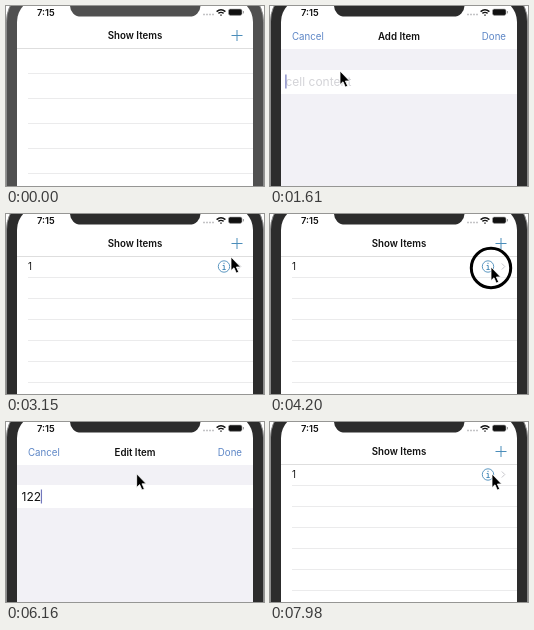
Animation of 258x180 px, one loop 8 s. Source, as an HTML page:

```html
<!DOCTYPE html>
<html lang="en">
<head>
<meta charset="utf-8">
<style>
  html, body { margin: 0; width: 100%; height: 100%; overflow: hidden; background: #fff; }
  svg { display: block; width: 100vw; height: 100vh; }
  text { font: 9.7px Inter, "Liberation Sans", sans-serif; fill: #111; }
  .bold { font-weight: 600; }
  .mid { text-anchor: middle; }
  .link { fill: #5d86c6; }
  .field { font-size: 12px; }
  .line { fill: none; stroke: #ebebec; }
  .blue { fill: none; stroke: #4b8dba; }
</style>
</head>
<body>
<svg viewBox="0 0 258 180">
  <defs>
    <clipPath id="glass"><rect x="11" y="-8" width="236" height="300" rx="24"/></clipPath>
  </defs>
  <rect id="bezel" x="0.5" y="-19.5" width="257" height="320" rx="35" stroke="#8b8b8b"/>
  <g clip-path="url(#glass)">
    <rect x="11" y="-8" width="236" height="190" fill="#fff"/>

    <g id="list">
      <text class="bold mid" x="129" y="33">Show Items</text>
      <path class="blue" d="M225.5 29.5h11M231 24v11"/>
      <path class="line" d="M11 42.5h236" style="stroke:#dedede"/>
      <path class="line" id="rows"/>
      <g id="item">
        <text x="22" y="56">1</text>
        <circle class="blue" cx="218" cy="52.5" r="5.7" stroke-width=".9"/>
        <path class="blue" d="M216.7 51.5h1.5v4M216.5 55.5h3.2M218 48.8v1.3"/>
        <path d="M231.8 49.5l3 3-3 3" fill="none" stroke="#c7c7cc"/>
      </g>
    </g>

    <g id="form">
      <rect x="11" y="43" width="236" height="140" fill="#f2f1f6"/>
      <rect id="cell" x="11" width="236" fill="#fff"/>
      <text class="link" id="cancel" x="22" y="33.5">Cancel</text>
      <text class="bold mid" id="title" x="129" y="33.5"></text>
      <text class="link" id="done" x="236" y="33.5" text-anchor="end">Done</text>
      <text class="field" id="value" x="15.5"></text>
      <rect id="caret" width="1.2" height="14" fill="#7278bd"/>
    </g>

    <text class="bold" x="31" y="9.6" style="font-size:9.3px">7:15</text>
    <path d="M197 8.5h12" stroke="#c4c4c6" stroke-width="1.6" stroke-dasharray="2 1"/>
    <g fill="none" stroke="#111" stroke-width="1.4">
      <path d="M210.6 5.6q4.4-3.8 8.8 0M212.4 7.4q2.6-2 5.2 0"/>
      <path d="M214.3 9.1h1.4"/>
    </g>
    <rect x="222.5" y="3" width="13.5" height="6.4" rx="1.8" fill="#111" stroke="#aaa" stroke-width=".6"/>
    <path d="M237.4 5v2.4" stroke="#999"/>
  </g>
  <rect id="notch" x="64" y="-30" width="130.5" height="40.6" rx="11"/>
  <circle id="ring" cx="221" cy="54" r="19.7" fill="none" stroke="#000" stroke-width="3"/>
  <path id="cursor" d="M0 0v13.6l3-2.8 2.3 5.3 2.4-1-2.3-5.1h4.2z" stroke="#fff" stroke-width=".8"/>
</svg>
<script>
const LOOP = 8000;
const $ = id => document.getElementById(id);
const show = (id, on) => $(id).setAttribute('visibility', on ? 'inherit' : 'hidden');
const set = (id, attrs) => { for (const k in attrs) $(id).setAttribute(k, attrs[k]); };

// Pointer stops: time, x, y
const stops = [
  [0, 163, 184], [630, 232, 34], [770, 232, 34], [840, 233, 35], [1260, 233, 35],
  [1610, 70, 65], [2170, 70, 65], [2730, 228, 34], [3080, 228, 34], [3150, 225, 43],
  [3430, 190, 80], [3780, 221, 54], [3920, 221, 53], [4410, 221, 53],
  [5040, 56, 67], [5810, 56, 67], [6580, 228, 32], [6650, 228, 32], [7070, 52, 30],
  [7280, 52, 30], [7770, 238, 47], [7980, 222, 52], [LOOP, 222, 52]
];

function pointer(t) {
  const i = stops.findIndex(s => s[0] > t);
  const [t0, x0, y0] = stops[i - 1], [t1, x1, y1] = stops[i];
  const p = (t - t0) / (t1 - t0), e = p * p * (3 - 2 * p);
  return [x0 + (x1 - x0) * e, y0 + (y1 - y0) * e];
}

function draw(t) {
  const adding = t >= 1260 && t < 2940;
  const editing = t >= 4410 && t < 7140;
  const form = adding || editing;
  const saved = t >= 2940;

  const shell = t < 980 ? '#505050' : '#2c2c2c';
  set('bezel', { fill: shell });
  set('notch', { fill: shell });

  show('list', !form);
  show('form', form);
  show('item', saved);
  const gap = saved ? 21 : 25;
  let rows = '';
  for (let y = 42.5 + gap; y < 180; y += gap) rows += `M22 ${y}H247`;
  set('rows', { d: rows });

  const typed = adding ? (t < 2100 ? '' : '1') : t < 5390 ? '1' : t < 5600 ? '12' : '122';
  const base = adding ? 80 : 79;
  set('cell', { y: adding ? 64 : 63, height: adding ? 24 : 23 });
  $('title').textContent = adding ? 'Add Item' : 'Edit Item';
  $('value').textContent = typed || 'cell content';
  set('value', { y: base, style: typed ? '' : 'fill:#d3d3d7' });
  const width = typed && form ? $('value').getComputedTextLength() : 0;
  set('caret', { x: 15.3 + width, y: base - 11.5 });
  show('caret', adding || editing && t >= 5180);
  set('cancel', { opacity: t >= 6990 && t < 7140 ? 0.18 : 1 });
  set('done', { opacity: t >= 2800 && t < 2940 ? 0.18 : 1 });

  show('ring', t >= 4200 && t < 4410);
  set('cursor', { transform: `translate(${pointer(t)})` });
}

function tick() {
  draw(performance.now() % LOOP);
  requestAnimationFrame(tick);
}
tick();
</script>
</body>
</html>
```
